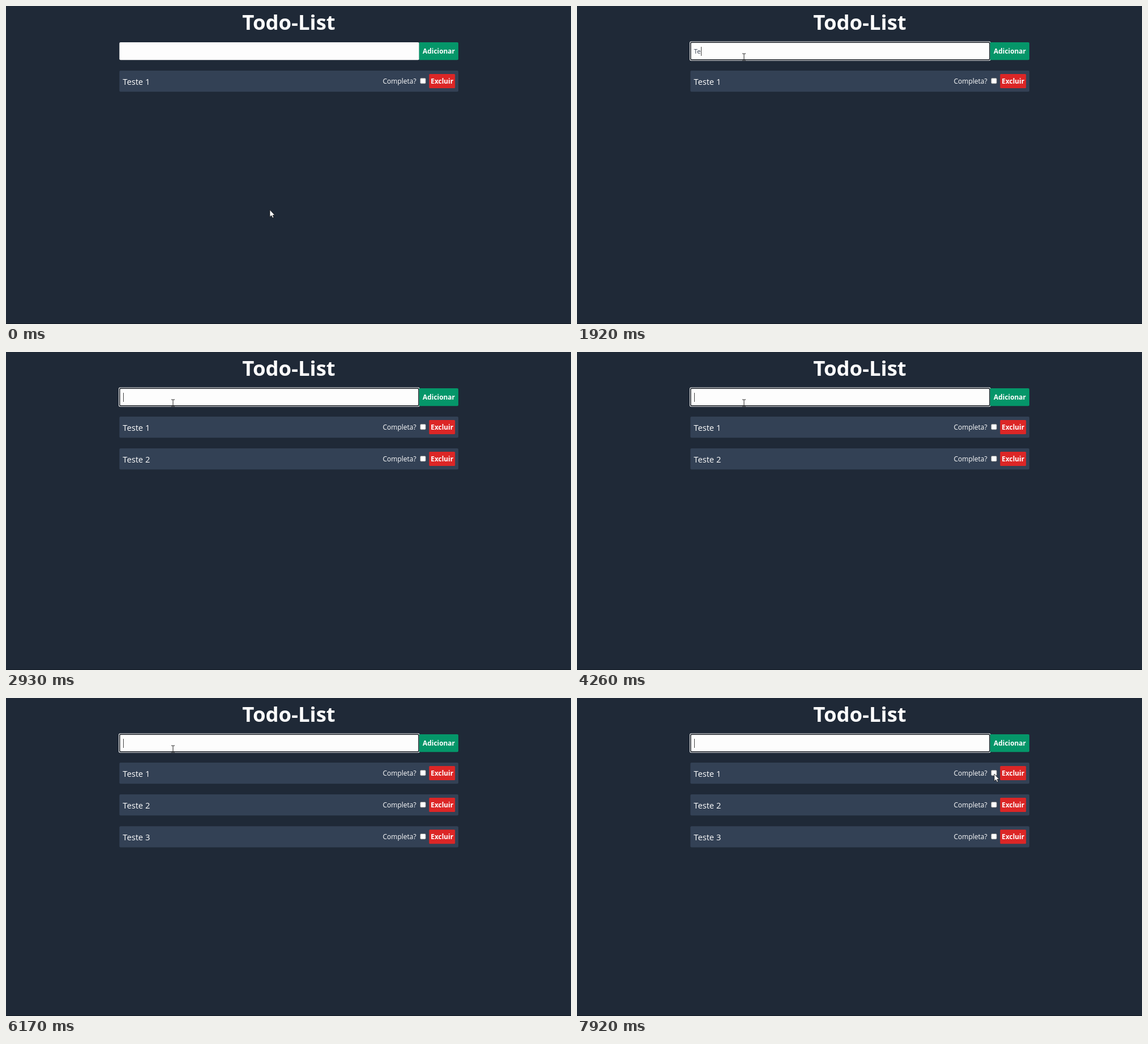
Animation, 998 px wide and 561 px high, one loop 8 s. Source, as an HTML page:

```html
<!DOCTYPE html>
<html lang="pt">
<head>
<meta charset="utf-8">
<title>Todo-List</title>
<style>
  html, body { margin: 0; width: 100%; height: 100%; overflow: hidden; background: #1f2937; }
  svg { display: block; width: 998px; height: 561px; font-family: "Open Sans", "Noto Sans", sans-serif; }
  .bold { font-weight: 700; font-size: 11.9px; }
  #entry { white-space: pre; }
</style>
</head>
<body>
<svg viewBox="0 0 998 561" fill="#fff">
  <defs>
    <g id="controls">
      <rect x="200.3" y="114" width="598.7" height="37.2" rx="2" fill="#334155"/>
      <text x="665.5" y="137" font-size="12">Completa?</text>
      <rect x="731.7" y="127.3" width="9.6" height="9.6" rx="1.6" stroke="#767676" stroke-width=".8"/>
      <rect x="747.4" y="120" width="45.8" height="25" rx="1.5" fill="#dc2626"/>
      <text x="770.2" y="137" class="bold" text-anchor="middle">Excluir</text>
    </g>
  </defs>
  <rect width="998" height="561" fill="#1f2937"/>
  <rect y="560" width="998" height="1" fill="#131a24"/>
  <text x="499.5" y="42" font-size="36.5" font-weight="700" text-anchor="middle">Todo-List</text>

  <rect x="200.3" y="64" width="529.5" height="31.2" rx="2" fill="#fdfdfd"/>
  <g id="focus">
    <rect x="199" y="62.6" width="531.7" height="34" rx="2.5"/>
    <rect x="200" y="63.6" width="529.7" height="32" rx="2" fill="#10151d"/>
    <rect x="201.5" y="65.1" width="526.7" height="29" rx="1" fill="#fdfdfd"/>
  </g>
  <path d="M729.7 64h67.3a2 2 0 0 1 2 2v27.2a2 2 0 0 1-2 2h-67.3z" fill="#059669"/>
  <text x="764.5" y="84" class="bold" text-anchor="middle">Adicionar</text>
  <text id="entry" x="206.5" y="84" font-size="11.6" fill="#374151"></text>
  <rect id="caret" y="72" width="1" height="16" fill="#444"/>

  <g id="list"></g>

  <path id="arrow" d="M0 0V12.8L2.9 10.2 4.9 14.5 7 13.6 5.1 9.5H8.9Z" stroke="#111" stroke-width=".8"/>
  <path id="beam" d="M-3 -6H-.8L0 -5.4 .8 -6H3M0 -5.4V5.4M-3 6H-.8L0 5.4 .8 6H3" fill="none" stroke="#222"/>
</svg>
<script>
const DURATION = 8000;
const FOCUS_AT = 840;
const BLINK = 530;
const TEXT_X = 206.5;
const ROW_STEP = 56.1;
const $ = id => document.getElementById(id);

// Typing has an even rhythm that slows down after the word
const WORD = "Teste";
const ENTRIES = [
  { text: `${WORD} 2`, start: 1770, gap: 135, pause: 50, submit: 2930 },
  { text: `${WORD} 3`, start: 4380, gap: 158, pause: 230, submit: 6170 }
];
const keyTimes = ({ text, start, gap, pause }) =>
  [...text].map((_, i) => start + i * gap + Math.max(0, i - WORD.length + 1) * pause);
const presses = ENTRIES.flatMap(keyTimes);

// Pointer glides, drawn in discrete steps; bend is the ease-out power per axis
const GLIDES = [
  { start: 250, every: 120, steps: 4, from: [466, 359.5], to: [296.5, 92], bend: [1.7, 1] },
  { start: 1000, every: 120, steps: 2, from: [296.5, 91], to: [295, 90], bend: [1, 1] },
  { start: 7260, every: 130, steps: 6, from: [295, 90], to: [737, 134], bend: [2.4, 4] }
];
const BEAM_FROM = 760;
const BEAM_TO = GLIDES[2].start;

function pointerAt(t) {
  const { start, every, steps, from, to, bend } = GLIDES.findLast(g => t >= g.start) ?? GLIDES[0];
  const step = Math.floor((t - start) / every) + 1;
  const u = Math.min(Math.max(step / steps, 0), 1);
  return from.map((a, axis) => a + (to[axis] - a) * (1 - (1 - u) ** bend[axis]));
}

const rows = [`${WORD} 1`, ...ENTRIES.map(e => e.text)].map((label, i) => {
  const row = document.createElementNS("http://www.w3.org/2000/svg", "g");
  row.setAttribute("transform", `translate(0 ${i * ROW_STEP})`);
  row.innerHTML = `<use href="#controls"/><text x="206.3" y="138.5" font-size="14.7">${label}</text>`;
  $("list").append(row);
  return row;
});

const show = (node, visible) => node.setAttribute("visibility", visible ? "visible" : "hidden");

function render(t) {
  show($("focus"), t >= FOCUS_AT);
  rows.forEach((row, i) => show(row, i === 0 || t >= ENTRIES[i - 1].submit));

  const entry = ENTRIES.find(e => t < e.submit);
  const typed = entry ? entry.text.slice(0, keyTimes(entry).filter(k => t >= k).length) : "";
  $("entry").textContent = typed;
  const typedWidth = typed ? $("entry").getComputedTextLength() : 0;
  $("caret").setAttribute("x", Math.round(TEXT_X + typedWidth));

  // Each key press restarts the blink
  const lastPress = presses.findLast(k => t >= k) ?? FOCUS_AT;
  show($("caret"), t >= FOCUS_AT && Math.floor((t - lastPress) / BLINK) % 2 === 0);

  const beam = t >= BEAM_FROM && t < BEAM_TO;
  show($("beam"), beam);
  show($("arrow"), !beam);
  $(beam ? "beam" : "arrow").setAttribute("transform", `translate(${pointerAt(t)})`);
}

const start = performance.now();
function tick() {
  render((performance.now() - start) % DURATION);
  requestAnimationFrame(tick);
}
tick();
</script>
</body>
</html>
```
